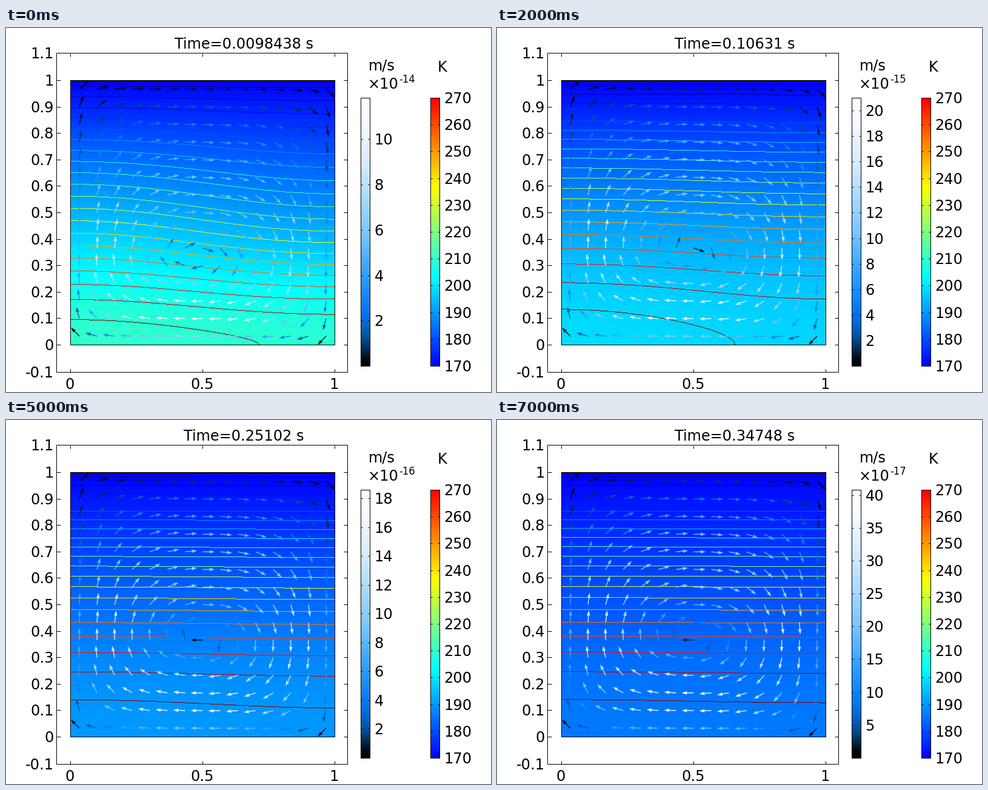
Animation of 800x600 px, one loop 8 s. Source, as a matplotlib script:

```python
import numpy as np
import matplotlib.pyplot as plt
from matplotlib.animation import FuncAnimation
from matplotlib.colors import LinearSegmentedColormap
from matplotlib.patches import Rectangle

PX = 0.72  # points per pixel at 100 dpi
FRAMES = 8
T0, DT = 0.0098438, 0.0482344
LEFT, FLOOR, SIDE = 106, 522, 436
BAR_TOP, BAR_BOTTOM = 115, 557

# Top speed of each frame, as mantissa and power of ten
SPEEDS = [(11.83, -14), (48.8, -15), (21.0, -15), (9.14, -15),
          (41.2, -16), (18.6, -16), (8.65, -16), (40.8, -17)]

rainbow = LinearSegmentedColormap.from_list(
    "rainbow_bar", ["#0000ff", "#00ffff", "#ffff00", "#ff0000"], N=512)
aurora = LinearSegmentedColormap.from_list("aurora_bar", [
    (0, (0, 0, 0)), (0.025, (0, 0.03, 0.05)), (0.06, (0, 0.16, 0.29)),
    (0.1, (0, 0.30, 0.57)), (0.16, (0, 0.41, 0.83)),
    (0.22, (0.02, 0.49, 0.95)), (0.33, (0.17, 0.61, 1)),
    (0.5, (0.48, 0.78, 1)), (0.75, (0.83, 0.92, 1)),
    (0.9, (0.96, 0.98, 1)), (1, (1, 1, 1))], N=512)

plt.rcParams["font.family"] = "DejaVu Sans"
fig = plt.figure(figsize=(8, 6), dpi=100, facecolor="white")
ax = fig.add_axes([0, 0, 1, 1])
ax.axis("off")


def to_px(x, y):
    return LEFT + 0.5 + SIDE * x, FLOOR + 0.5 - SIDE * y


def line(xs, ys):
    """One-pixel rule; whole coordinates snap to that pixel."""
    return ax.plot(xs, ys, color="black", lw=PX, zorder=6, snap=True,
                   solid_capstyle="butt")[0]


def box(left, top, right, bottom):
    ax.add_patch(Rectangle((left, top), right - left, bottom - top, fill=False,
                           ec="black", lw=PX, zorder=6, snap=True))


def label(x, y, text, align="left", size=24):
    """Text with its baseline at y."""
    return ax.text(x, y, text, ha=align, va="baseline", size=size * PX,
                   color="black", zorder=8)


def bar_ticks(left, y):
    return [line([left, left + 3], [y, y]),
            line([left + 12, left + 15], [y, y])]


def temperature(x, y, t):
    """Cosine modes of heat conduction: cold top, insulated sides and floor."""
    rate = 9.3 * (t - T0)
    modes = [(1, 0.8737, 0.041), (3, 0.0816, -0.0206),
             (5, 0.0238, -0.005), (7, 0.0055, 0)]
    total = 0
    for n, even, tilt in modes:
        decay = np.exp(-rate * n * n / 4)
        across = even + tilt * np.exp(-rate) * np.cos(np.pi * x)
        total = total + across * decay * np.cos(n * np.pi * y / 2)
    return 40 * total


def velocity(x, y, n):
    """Clockwise cell from a stream function that is flat at every wall."""
    yc = 0.335 + 0.0465 * (1 - np.exp(-n / 3))
    k = 2 / yc - 2 / (1 - yc)
    j = 7.2 * max(0, 0.3667 - yc)
    s = 4 * x * (1 - x)
    ds = 4 - 8 * x
    ex = np.exp(-j * (x - 0.5))
    fx = s**2 * (2 - s) * ex
    dfx = (4 * s - 3 * s**2) * ds * ex - j * fx
    fy = (y * (1 - y))**2 * np.exp(-k * y)
    dfy = (2 * y * (1 - y) * (1 - 2 * y) - k * (y * (1 - y))**2) * np.exp(-k * y)
    return -fx * dfy, dfx * fy


def paint(heat):
    """Surface colours with one-pixel isolines at twenty even levels."""
    image = rainbow(heat / 100)
    band = np.floor(20 * heat / heat.max() + 0.5).astype(int)
    edge = np.zeros(band.shape, bool)
    edge[:-1] |= band[:-1] > band[1:]
    edge[:, :-1] |= band[:, :-1] > band[:, 1:]
    image[edge] = level_colors[band[edge] - 1]
    return image


# Fixed frame, ticks and labels
box(83, 41, 563, 567)
box(LEFT, FLOOR - SIDE, LEFT + SIDE, FLOOR)
line([LEFT, LEFT + SIDE + 1], [FLOOR - SIDE + 1] * 2)
for i in range(-1, 12):
    y = 567 if i < 0 else 41 if i > 10 else round(FLOOR - SIDE * i / 10)
    line([83, 90], [y, y])
    line([557, 563], [y, y])
    label(79, y + 9, f"{i / 10:g}", "right")
for v in (0, 0.5, 1):
    x = LEFT + SIDE * v
    line([x, x], [42, 47])
    line([x, x], [562, 567])
    label(x - 0.5, 595, f"{v:g}", "center")

# Colour bars
ramp = np.linspace(1, 0, 442)[:, None]
for left, cmap in ((585, aurora), (700, rainbow)):
    ax.imshow(ramp, cmap=cmap, aspect="auto", vmin=0, vmax=1,
              extent=(left, left + 16, BAR_BOTTOM + 1, BAR_TOP), zorder=2)
    box(left, BAR_TOP, left + 15, BAR_BOTTOM)
for i in range(11):
    y = round(BAR_BOTTOM - 442 * i / 10)
    bar_ticks(700, y)
    label(722, y + 9, str(170 + 10 * i))
label(712, 71.5, "K")
label(597.5, 69.5, "m/s")
label(597, 100, "×10")
power = label(648, 90, "", size=16.5)
title = label(392.5, 34, "", "center")

# Fields
axis = np.linspace(0, 1, SIDE + 1)
gx, gy = np.meshgrid(axis, axis)
surface = ax.imshow(np.zeros(gx.shape + (4,)), aspect="auto", origin="lower",
                    interpolation="nearest", zorder=2,
                    extent=(LEFT, LEFT + SIDE + 1, FLOOR + 1, FLOOR - SIDE))
ax.set_xlim(0, 800)
ax.set_ylim(600, 0)
spots = (np.arange(15) + 0.5) / 15
ux, uy = np.meshgrid(spots, spots)
arrows = ax.quiver(*to_px(ux, uy), ux, uy, ux, cmap=aurora, angles="xy",
                   units="xy", scale_units="xy", scale=1, width=1.35,
                   headwidth=4.2, headlength=6.5, headaxislength=6,
                   minlength=0, zorder=5)
arrows.set_clim(0, 1)
ax.set_xlim(0, 800)
ax.set_ylim(600, 0)
level_colors = plt.get_cmap("jet")(np.linspace(0, 1, 20))

changing = []


def update(n):
    while changing:
        changing.pop().remove()
    t = T0 + n * DT
    title.set_text(f"Time={t:.5g} s")
    surface.set_data(paint(temperature(gx, gy, t)))

    peak = np.hypot(*velocity(gx, gy, n)).max()
    u, v = velocity(ux, uy, n)
    speed = np.hypot(u, v)
    arrows.set_UVC(19.8 * u / speed, -19.8 * v / speed, speed / peak)

    top, exponent = SPEEDS[n]
    power.set_text(str(exponent))
    step = 1 if top < 10 else 2 if top < 25 else 5
    for value in range(step, int(top) + 1, step):
        y = round(BAR_BOTTOM - 442 * value / top)
        changing.extend(bar_ticks(585, y))
        changing.append(label(607.5, y + 9, str(value)))
    return []


anim = FuncAnimation(fig, update, frames=FRAMES, interval=1000,
                     init_func=lambda: update(0), repeat=True, repeat_delay=0)
plt.show()
```
